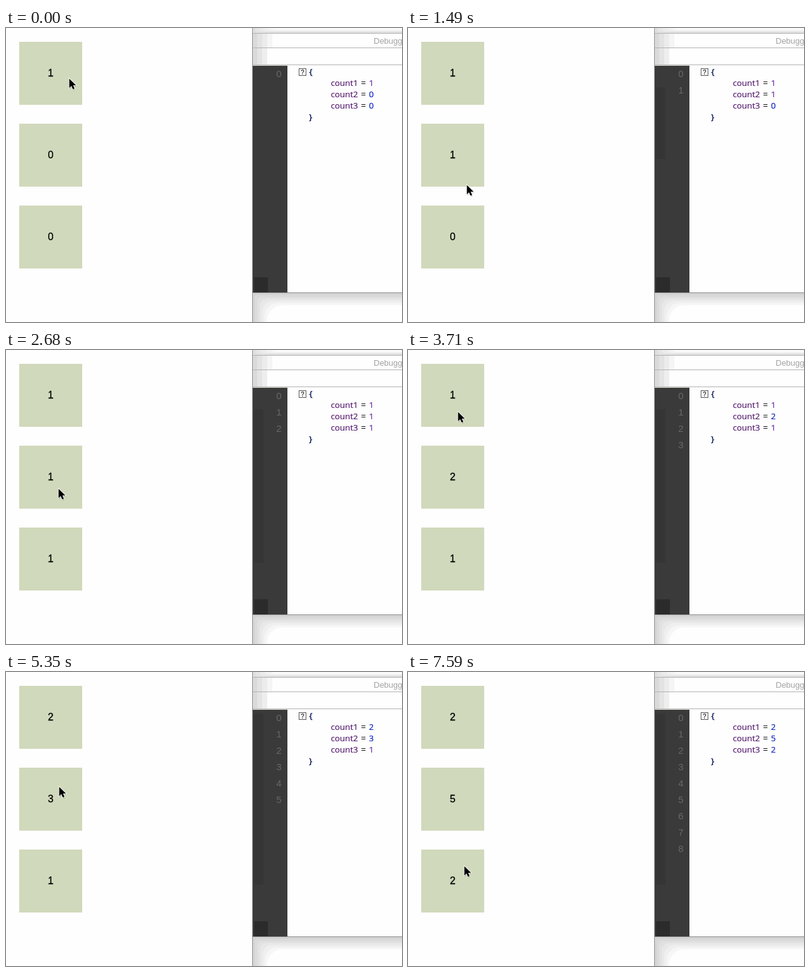
Write an HTML page that moves like this. It is 629x467 px and loops after 8000 ms.

```html
<!DOCTYPE html>
<html lang="en">
<head>
<meta charset="utf-8">
<title>Counters</title>
<style>
  html, body { margin: 0; width: 100%; height: 100%; overflow: hidden; background: #fefefe; }
  svg { display: block; width: 629px; height: 467px; }
  .count { font: 16px "Liberation Sans", Arial, sans-serif; text-anchor: middle; stroke: #000; stroke-width: .3px; }
  .log { font: 15px "Liberation Sans", Arial, sans-serif; text-anchor: middle; fill: #686868; }
  .code { font: 13.3px "Open Sans", "Noto Sans", sans-serif; stroke: currentColor; stroke-width: .2px; fill: currentColor; }
  .brace { color: #14205f; font-weight: 600; }
  .name { color: #551a70; }
  .title { font: 13px "Liberation Sans", Arial, sans-serif; fill: #a2a2a2; }
  .mark { font: bold 10px "Liberation Sans", Arial, sans-serif; text-anchor: middle; fill: #444; }
</style>
</head>
<body>
<svg id="stage" viewBox="0 0 629 467">
  <g id="back"></g>
  <g id="panel"></g>
  <g id="live"></g>
  <g id="cursor">
    <path d="M.5 1.5V16L4 12.8 6.2 18 9 16.9 6.8 11.8H11.5Z" opacity=".25" transform="translate(.6 1)"/>
    <path d="M.5.5V15.2L3.9 12 6.2 17.3 8.9 16.2 6.6 11H11.2Z" stroke="#fff" stroke-width="1.6" paint-order="stroke"/>
  </g>
</svg>
<script>
const LOOP = 8000;
const TICK = 148.6;

// Each move runs over ticks from..to, then clicks a box
const moves = [
  { from: 1, to: 6, x: 98, y: 175, click: 6, box: 1 },
  { from: 9, to: 12, x: 90, y: 294, click: 14, box: 2 },
  { from: 16, to: 18, x: 83, y: 220, click: 20, box: 1 },
  { from: 23, to: 25, x: 79, y: 98, click: 27, box: 0 },
  { from: 30, to: 32, x: 84, y: 181, click: 34, box: 1 },
  { from: 36, to: 39, x: 84, y: 185, click: 39, box: 1 },
  { from: 42, to: 43, x: 84, y: 185, click: 43, box: 1 },
  { from: 46, to: 49, x: 89, y: 308, click: 51, box: 2 }
];
const ease = p => p * (1.5 - p / 2);

const $ = id => document.getElementById(id);
const [back, panel, live, cursor] = ["back", "panel", "live", "cursor"].map($);

function add(parent, tag, attrs, text = "") {
  const el = document.createElementNS("http://www.w3.org/2000/svg", tag);
  for (const key in attrs) el.setAttribute(key, attrs[key]);
  el.textContent = text;
  return parent.appendChild(el);
}
const rect = (parent, x, y, width, height, fill, rx = 0) =>
  add(parent, "rect", { x, y, width, height, fill, rx });
const label = (parent, x, y, cls, text) =>
  add(parent, "text", { x, y, class: cls }, text);
const gray = v => `rgb(${v},${v},${v})`;

// Banded window shadows
rect(back, 391, 0, 238, 467, gray(212));
for (let i = 0; i < 5; i++)
  rect(back, 391 + i * 5, -80, 400, 88 - i * 1.2, gray(222 + i * 7), i * 5);
rect(back, 391, 9, 238, 50, "#fefefe");
for (let i = 0; i < 4; i++) {
  rect(back, 391 + i * 8, 9, 8, 22, gray(218 + i * 9));
  if (i < 3) rect(back, 391 + i * 8, 32, 8, 26, gray(218 + i * 10));
}
rect(back, 391, 421, 238, 46, gray(204));
for (let i = 0; i < 7; i++)
  rect(back, 391 + i * 3.9, 421 + i * 3.2, 400, 200, gray(i < 6 ? 211 + i * 7 : 254), i * 4.2);

// Debugger window
for (const y of [8, 31, 58]) rect(back, 391, y, 238, 1, "#b2b2b2");
rect(back, 447, 59, 182, 361, "#fefefe");
rect(back, 391, 59, 56, 1, "#dfe6da");
rect(back, 391, 60, 56, 360, "#3a3a3a");
rect(back, 391, 420, 238, 1, "#8c8c8c");
const strip = rect(panel, 394, 94, 15, 0, "#353535");
rect(panel, 394, 396, 22, 24, "#2b2b2b");
rect(panel, 391, 0, 1, 467, "#8e8e8e");

label(panel, 584, 25, "title", "Debugger");
add(panel, "rect", { x: 465.5, y: 64.5, width: 11, height: 11, fill: "#fefefe", stroke: "#555" });
label(panel, 471, 73.5, "mark", "?");
label(panel, 481.5, 73.5, "code brace", "{");
label(panel, 481.5, 145.5, "code brace", "}");

const boxes = [0, 1, 2].map(i => {
  rect(panel, 21, 22 + i * 130, 100, 100, "#d0d9bb");
  const y = 92 + i * 18;
  label(panel, 516, y, "code name", "count" + (i + 1));
  label(panel, 564, y, "code", "=");
  return {
    count: label(live, 71, 77 + i * 130, "count", ""),
    value: label(live, 576.5, y, "code", "")
  };
});
const logs = Array.from({ length: 9 }, (_, i) => label(live, 433.5, 78 + i * 26, "log", i));

function draw(time) {
  const tick = Math.floor((time + 8) / TICK);
  const counts = [1, 0, 0];
  let total = 1, x = 100, y = 80;
  for (const move of moves) {
    if (tick < move.from) break;
    const p = ease(Math.min(1, (tick - move.from + 1) / (move.to - move.from + 1)));
    x += (move.x - x) * p;
    y += (move.y - y) * p;
    if (tick >= move.click) {
      counts[move.box]++;
      total++;
    }
  }
  cursor.setAttribute("transform", `translate(${Math.round(x)} ${Math.round(y)})`);
  boxes.forEach(({ count, value }, i) => {
    count.textContent = value.textContent = counts[i];
    value.style.color = counts[i] === 1 ? "#6a30a8" : "#0a20c0";
  });
  logs.forEach((log, i) => log.setAttribute("visibility", i < total ? "visible" : "hidden"));

  const top = total > 4 ? 66 : 94;
  const bottom = total > 2 ? 338 : total > 1 ? 208 : top;
  strip.setAttribute("y", top);
  strip.setAttribute("height", bottom - top);
}

const start = performance.now();
function run() {
  draw((performance.now() - start) % LOOP);
  requestAnimationFrame(run);
}
run();
</script>
</body>
</html>
```
